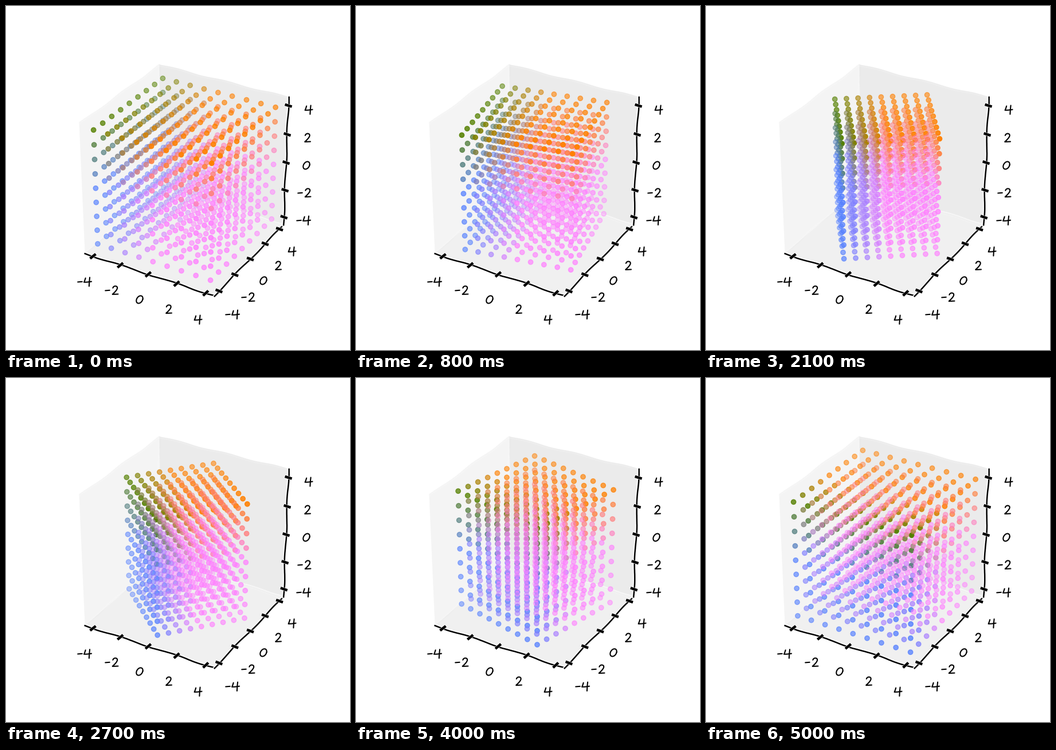
A matplotlib script for the animation above (5100 ms loop, 600 by 600 pixels).

```python
import numpy as np
import matplotlib.pyplot as plt
from matplotlib.animation import FuncAnimation
from matplotlib.patches import Polygon
from matplotlib.patheffects import withStroke

SIZE, STEPS = 600, 50
UNIT = 1 / 8.8                      # world size of one data unit
EDGE = 4.4 * (1 + 1 / 24)           # panes reach slightly past the limits
DIST, FOCAL = 10, 462 / 0.185
CENTER = np.array([313.74, 296.76])
AZIM, ELEV = np.radians(-60), np.radians(30)
HALO = [withStroke(linewidth=4, foreground="w")]

ca, sa, ce, se = np.cos(AZIM), np.sin(AZIM), np.cos(ELEV), np.sin(ELEV)
RIGHT = np.array([-sa, ca, 0])
UP = np.array([-se * ca, -se * sa, ce])
TOWARD = np.array([ce * ca, ce * sa, se])


def project(points):
    """Return pixel positions (y down) and distances from the camera."""
    p = np.asarray(points, float) * UNIT
    depth = DIST - p @ TOWARD
    flat = np.stack([p @ RIGHT, -(p @ UP)], axis=-1)
    return CENTER + FOCAL * flat / depth[..., None], depth


fig = plt.figure(figsize=(6, 6), dpi=100, facecolor="white")
ax = fig.add_axes([0, 0, 1, 1])
ax.set(xlim=(0, SIZE), ylim=(SIZE, 0))
ax.axis("off")


def roughen(artist):
    artist.set_sketch_params(1, 100, 2)
    artist.set_path_effects(HALO)


def add_pane(signs, grey):
    corners, _ = project(EDGE * np.array(signs))
    pane = Polygon(corners, closed=False, facecolor=str(grey),
                   edgecolor=str(grey), alpha=0.5, lw=1, zorder=1)
    roughen(ax.add_patch(pane))


def add_line(ends, lw, zorder):
    ends = np.asarray(ends)
    line, = ax.plot(ends[:, 0], ends[:, 1], color="k", lw=lw, zorder=zorder,
                    solid_capstyle="projecting")
    roughen(line)


def add_axis(start, end, axis, tick_dir):
    ends = EDGE * np.array([start, end], float)
    add_line(project(ends)[0], 1.8, 2)
    for value in range(-4, 5, 2):
        spot = ends[0].copy()
        spot[axis] = value
        outer, inner = spot.copy(), spot.copy()
        outer[tick_dir] += 0.1 * np.sign(spot[tick_dir])
        inner[tick_dir] -= 0.1 * np.sign(spot[tick_dir])
        (a, b), _ = project([outer, inner])
        step = 4 * (b - a) / np.hypot(*(b - a))
        mid = (a + b) / 2
        add_line([mid - step, mid + step], 3.3, 3)


# Handwritten figures as pen strokes, in pixels around their middle, y up.
turn = np.linspace(0.15, 2 * np.pi + 0.1, 30)
oval = np.column_stack([5.4 * np.cos(turn) + 1.8 * np.sin(turn),
                        6.6 * np.sin(turn)])
GLYPHS = {
    "0": [oval],
    "2": [[(-4.2, 4.2), (-3, 6.3), (-0.8, 7.5), (1.8, 7.3), (3.5, 5.8),
           (3.7, 3.6), (2.4, 0.8), (0, -2.2), (-2.8, -5), (-4.8, -6.9),
           (-1, -6.8), (5, -6.5)]],
    "4": [[(-3.8, 6.5), (-5, 2.6), (-6.4, -0.8), (-1, -0.6), (6.6, 0.4)],
          [(3.6, 7.6), (2.9, 1), (2.4, -7.8)]],
    "-": [[(-3.8, -0.4), (3.8, 0.2)]],
}


def add_label(value, x, y):
    text = str(value)
    places = [0] if len(text) == 1 else [-8, 5.5]
    for char, dx in zip(text, places):
        for stroke in GLYPHS[char]:
            pts = np.asarray(stroke)
            ax.plot(x + dx + pts[:, 0], y - pts[:, 1], color="k", lw=1.5,
                    solid_capstyle="round", solid_joinstyle="round", zorder=4)


add_pane([(-1, -1, -1), (-1, 1, -1), (-1, 1, 1), (-1, -1, 1)], 0.95)
add_pane([(-1, 1, -1), (1, 1, -1), (1, 1, 1), (-1, 1, 1)], 0.9)
add_pane([(-1, -1, -1), (1, -1, -1), (1, 1, -1), (-1, 1, -1)], 0.925)
add_axis((-1, -1, -1), (1, -1, -1), 0, 1)
add_axis((1, 1, -1), (1, -1, -1), 1, 0)
add_axis((1, 1, -1), (1, 1, 1), 2, 0)

label_spots = [
    [(137, 481), (185, 496), (233, 512), (284, 529), (335, 547)],
    [(395, 538), (423, 508), (449, 479), (475, 453), (499, 428)],
    [(519, 374), (521, 326), (524, 278), (526, 230), (528, 181)],
]
for row in label_spots:
    for value, (x, y) in zip(range(-4, 5, 2), row):
        add_label(value, x, y)

# Lattice coloured by its starting x and z.
ticks = np.linspace(-4, 4, 9)
grid = np.array([(x, y, z) for x in ticks for y in ticks for z in ticks])
rgba = np.column_stack([np.minimum(1, 1 + grid[:, 0] / 6),
                        np.full(len(grid), 0.5),
                        np.minimum(1, 1 - grid[:, 2] / 4),
                        np.ones(len(grid))])
QUARTER_TURN = np.array([[0, -1, 0], [1, 0, 0], [0, 0, 1]])
dots = ax.scatter(grid[:, 0], grid[:, 1], s=36, c=rgba, linewidths=1, zorder=5)


def update(frame):
    t = frame / STEPS
    matrix = (1 - t) * np.eye(3) + t * QUARTER_TURN
    flat, depth = project(grid @ matrix.T)
    near = 1 / depth
    fade = (near.max() - near) / np.ptp(near)
    colors = rgba.copy()
    colors[:, 3] = 1 - 0.7 * fade
    dots.set_offsets(flat)
    dots.set_facecolor(colors)
    dots.set_edgecolor(colors)
    return (dots,)


anim = FuncAnimation(fig, update, frames=STEPS + 1, interval=100, repeat=True)
plt.show()
```
